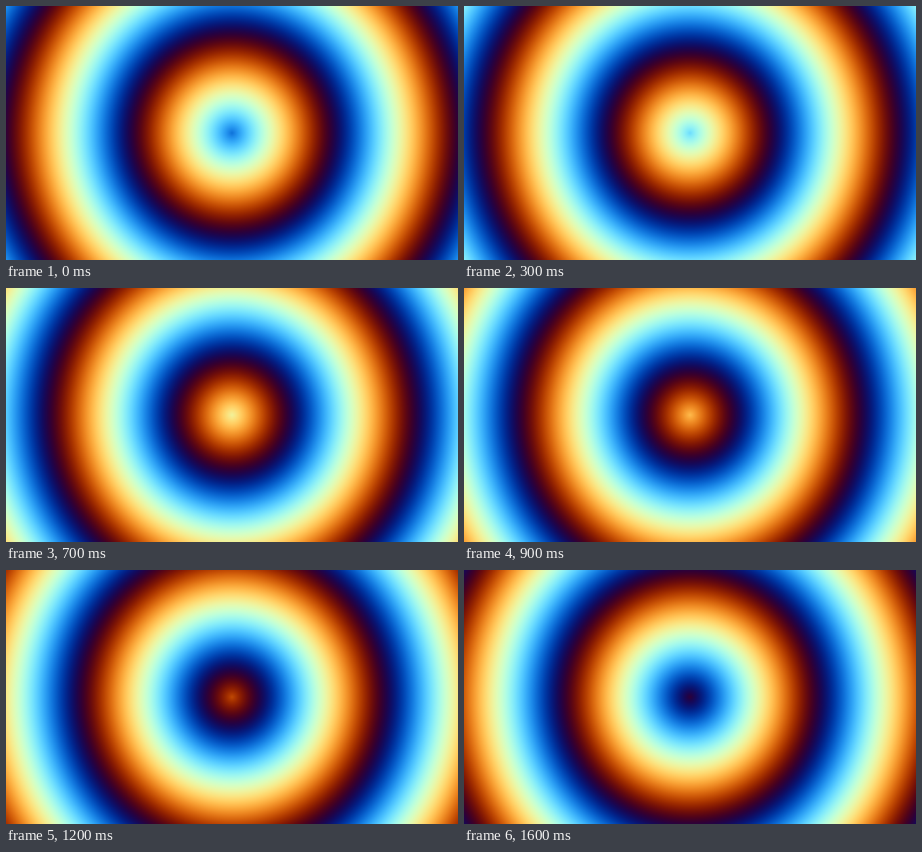
These frames come from a looping animation (690 px wide and 388 px high, 1700 ms). An HTML page with a canvas:

```html
<!DOCTYPE html>
<html lang="en">
<head>
<meta charset="utf-8">
<title>Colour rings</title>
<style>
html, body { margin: 0; width: 100%; height: 100%; overflow: hidden; }
canvas { display: block; }
</style>
</head>
<body>
<canvas width="690" height="388"></canvas>
<script>
const LOOP = 1700, STEP = 100;
const START = 0.318, SPEED = 0.49; // palette turns, turns per second
const OFFSETS = [0.263, 0.416, 0.557];

const canvas = document.querySelector('canvas');
const ctx = canvas.getContext('2d');
const { width, height } = canvas;
const image = ctx.createImageData(width, height);
const data = image.data.fill(255);

// Cosine palette: one full turn repeats the colours.
const channel = (turn, offset) => 127.5 + 127.5 * Math.cos(2 * Math.PI * (turn + offset));

// Distance from the centre, where 1 is half the height.
const radius = Float32Array.from({ length: width * height }, (_, i) =>
  Math.hypot(i % width + 0.5 - width / 2, Math.floor(i / width) + 0.5 - height / 2) / (height / 2));

const SHADES = 2048;
const palette = OFFSETS.map(offset =>
  Uint8ClampedArray.from({ length: SHADES }, (_, i) => channel(i / SHADES, offset)));

function draw(ms) {
  const phase = START + SPEED * ms / 1000;
  for (let i = 0; i < radius.length; i++) {
    const shade = (radius[i] + phase) * SHADES & SHADES - 1;
    for (let c = 0; c < 3; c++) data[i * 4 + c] = palette[c][shade];
  }
  ctx.putImageData(image, 0, 0);
}

const begin = performance.now();
let shown = -1;

function tick() {
  const elapsed = (performance.now() - begin) % LOOP;
  const ms = Math.floor(elapsed / STEP) * STEP;
  if (ms !== shown) draw(shown = ms);
  requestAnimationFrame(tick);
}
tick();
</script>
</body>
</html>
```
